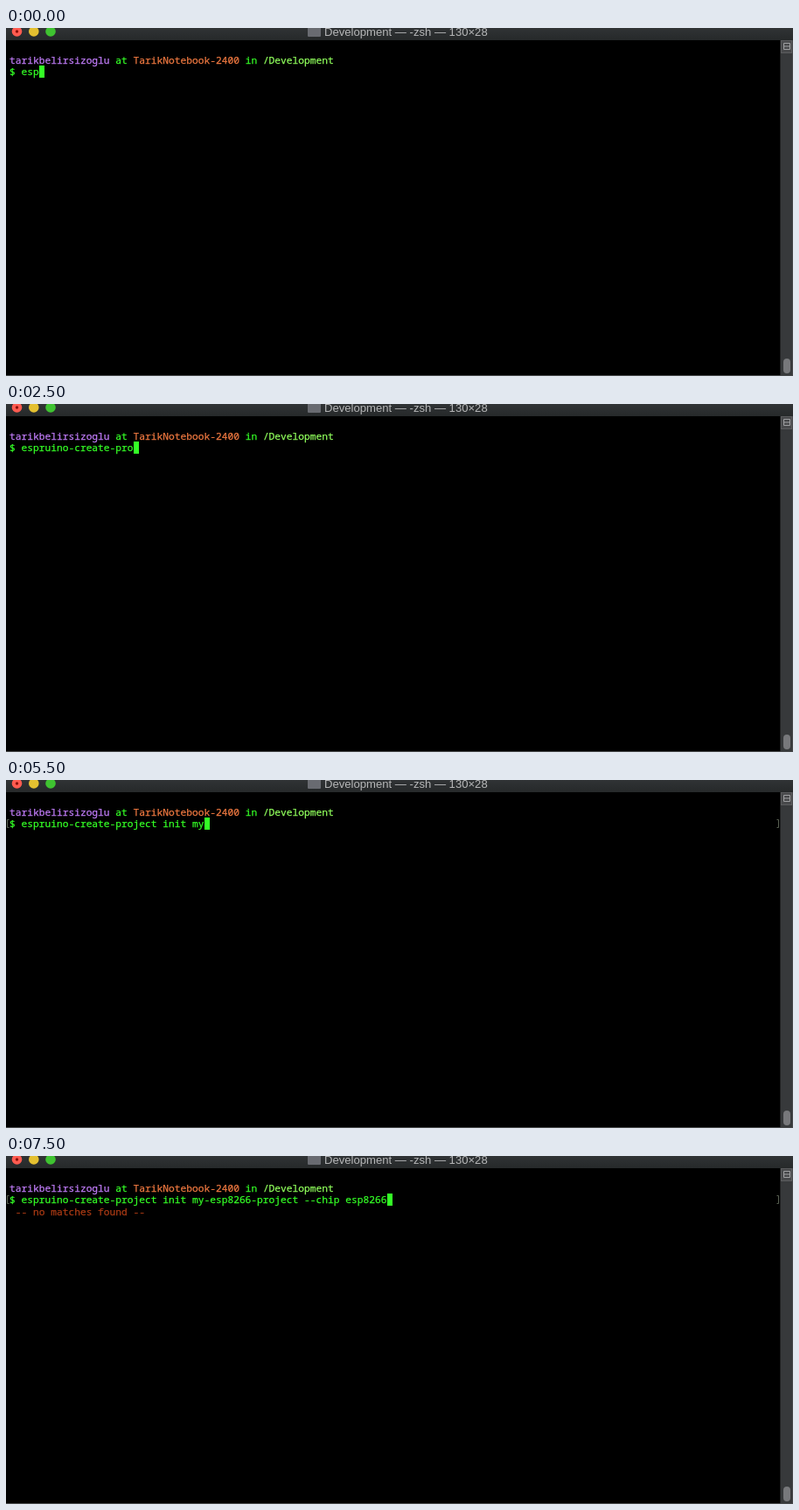
An HTML page that plays this animation: 900 by 399 pixels, repeating every 8000 ms.

```html
<!DOCTYPE html>
<html lang="en">
<head>
<meta charset="utf-8">
<title>Terminal</title>
<style>
  html, body { margin: 0; width: 100%; height: 100%; overflow: hidden; background: #000; }
  svg { display: block; width: 900px; height: 399px; }
  text { white-space: pre; }
  .term, .term tspan { fill: currentColor; stroke: currentColor; stroke-width: 0.25px; }
  .term { font: 500 11.24px "Noto Sans Mono", "DejaVu Sans Mono", monospace; color: #34ff26; }
  .title { font: 13.1px "Liberation Sans", Inter, sans-serif; fill: #b6b7b8; }
  .user { color: #c07cf8; }
  .host { color: #ee7840; }
  .path { color: #90ff5c; }
  .warn { color: #a93a14; }
  .bracket { fill: none; stroke: #596052; }
</style>
</head>
<body>
<svg viewBox="0 0 900 399">
  <defs>
    <linearGradient id="bar" x2="0" y2="1">
      <stop offset="0" stop-color="#303335"/>
      <stop offset="1" stop-color="#26292a"/>
    </linearGradient>
  </defs>
  <rect width="900" height="399"/>

  <!-- Title bar -->
  <rect width="900" height="14" fill="url(#bar)"/>
  <circle cx="12.5" cy="4" r="5.8" fill="#ff5b50"/>
  <circle cx="12.5" cy="4" r="1.7" fill="#8a1009"/>
  <circle cx="31.8" cy="4" r="5.8" fill="#e4c030"/>
  <circle cx="51" cy="4" r="5.8" fill="#3fc331"/>
  <rect x="345" y="-2" width="15" height="12" rx="1" fill="#696b71"/>
  <text class="title" x="364" y="9">Development — -zsh — 130×28</text>

  <!-- Scrollbar -->
  <rect x="886" y="14" width="13" height="384" fill="#37393b"/>
  <path d="M885.5 14V398" stroke="#202122"/>
  <rect x="886.5" y="14.5" width="12" height="14" fill="#48494b" stroke="#5b5c5e"/>
  <path d="M889.5 17.5h7v7h-7zM889.5 21h7" fill="none" stroke="#a0a1a3"/>
  <rect x="889" y="379" width="8" height="17" rx="4" fill="#77787b"/>
  <path d="M0 398.5H900M899.5 14V399" stroke="#46484a"/>

  <!-- Terminal -->
  <text class="term" x="4" y="41"><tspan class="user">tarikbelirsizoglu</tspan> at <tspan class="host">TarikNotebook-2400</tspan> in <tspan class="path">/Development</tspan></text>
  <text class="term" id="line" x="4" y="54"></text>
  <text class="term warn" id="warn" x="4" y="67.5"> -- no matches found --</text>
  <path class="bracket" id="marks" d="M3.5 45.5h-2v9h2M881.5 45.5h2v9h-2"/>
  <rect id="cursor" y="43" width="6" height="14" fill="#34ff26"/>
</svg>
<script>
  const command = "$ espruino-create-project init my-esp8266-project --chip esp8266";
  const step = 500, loop = 8000, cell = 6.744;
  // Characters on the command line after each half second
  const typed = [5, 7, 10, 12, 15, 21, 26, 26, 28, 30, 31, 33, 34, 34, 34, 64];
  const get = id => document.getElementById(id);
  const line = get("line"), cursor = get("cursor"), warn = get("warn"), marks = get("marks");
  const show = (el, on) => el.setAttribute("visibility", on ? "visible" : "hidden");

  function draw(now) {
    const t = now % loop;
    const count = typed[Math.floor(t / step)];
    line.textContent = command.slice(0, count);
    cursor.setAttribute("x", Math.round(4 + count * cell));
    show(marks, t >= 3000);
    show(warn, t >= 6500);
  }

  const start = performance.now();
  function tick() {
    draw(performance.now() - start);
    requestAnimationFrame(tick);
  }
  tick();
</script>
</body>
</html>
```
